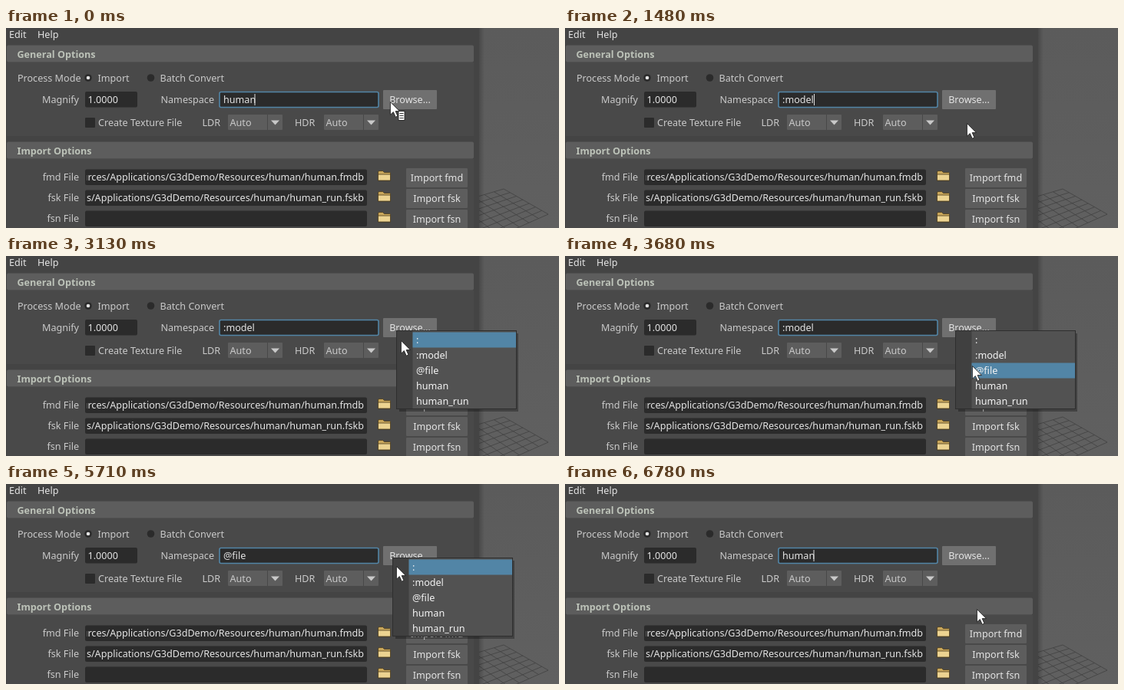
These frames come from a looping animation (720 px wide and 261 px high, 6.94 s). An HTML page:

```html
<!DOCTYPE html>
<html lang="en">
<head>
<meta charset="utf-8">
<title>Namespace menu</title>
<style>
html, body { margin: 0; width: 100%; height: 100%; overflow: hidden; background: #444; }
svg { display: block; }
text { font: 12.6px "Noto Sans", "Open Sans", sans-serif; fill: #cacaca; white-space: pre; }
.bold { font-weight: bold; fill: #bcc2b8; }
.end { text-anchor: end; }
.mid { text-anchor: middle; }
.lit { fill: #e4e4e4; }
#menu text { fill: #f4f4f4; }
</style>
</head>
<body>
<svg id="stage" width="720" height="261" viewBox="0 0 720 261"></svg>
<script>
const LOOP = 6940, ROW = 20;
const ITEMS = [':', ':model', '@file', 'human', 'human_run'];

const rect = (x, y, w, h, fill, extra = '') =>
  `<rect x="${x}" y="${y}" width="${w}" height="${h}" fill="${fill}" ${extra}/>`;
const text = (x, y, s, cls = '', id = '') => `<text x="${x}" y="${y}" class="${cls}" id="${id}">${s}</text>`;
const line = (a, b) => `M${a}L${b}`;
const mix = (a, b, u) => a.map((v, i) => v + (b[i] - v) * u);

const field = (x, y, w) => rect(x, y, w, 20.5, '#2b2b2b', 'rx="2"');
const header = (y, s) => rect(1, y, 608, 22, '#5d5d5d', 'rx="2"') + text(14.5, y + 16, s, 'bold');
const button = (x, y, w, s, fill = '#5d5d5d') =>
  rect(x, y, w, 25, fill, 'rx="1"') + text(x + w / 2, y + 17, s, 'mid lit');
const radio = (x, on) => `<circle cx="${x}" cy="65" r="4.8" fill="#2b2b2b"/>` +
  (on ? `<circle cx="${x}" cy="65" r="2.3" fill="#e4e4e4"/>` : '');
const combo = (x, label, labelX) => text(labelX, 128, label) +
  rect(x, 113, 71, 20, '#5d5d5d', 'rx="1"') + rect(x + 51, 113, 1, 20, '#484848') +
  text(x + 2.5, 128, 'Auto') + `<path d="M${x + 56} 120.5h11l-5.5 6z" fill="#c8c8c8"/>`;
const folder = y => `<g stroke="#4a3c1c" stroke-width=".8">` +
  `<path d="M484.5 ${y}v-11q0-1.5 1.5-1.5h4.5l2 2h7q1 0 1 1v9.5z" fill="#c9a75c"/>` +
  `<path d="M484.5 ${y}v-8h16v8z" fill="#ecd391"/></g>`;
const fileRow = (y, ext, path) => text(95, y + 15, ext + ' File', 'end') + field(103, y + .5, 367) +
  `<svg x="105" y="${y}" width="363" height="22">${text(361, 15, path, 'end lit')}</svg>` +
  folder(y + 15) + button(521, y - 1, 80, 'Import ' + ext);

function grid() {
  const top = [648, 210], right = [706, 243], left = [560, 236], near = [618, 282];
  const count = 7;
  let d = '';
  for (let i = 0; i <= count; i++) {
    const u = i / count;
    d += line(mix(top, right, u), mix(left, near, u)) + line(mix(top, left, u), mix(right, near, u));
  }
  return `<path d="${d}" fill="none" stroke="#424242" stroke-width=".8"/>`;
}

const stage = document.getElementById('stage');
stage.innerHTML = `
<defs>
  <linearGradient id="view" x2="0" y2="1"><stop stop-color="#5b5b5b"/><stop offset="1" stop-color="#606060"/></linearGradient>
  <linearGradient id="shade"><stop stop-opacity=".2"/><stop offset="1" stop-opacity="0"/></linearGradient>
</defs>
${rect(0, 0, 720, 261, 'url(#view)')}${grid()}${rect(616, 0, 7, 261, 'url(#shade)')}
${rect(0, 0, 616, 261, '#444')}${rect(1, 45, 608, 96, '#494949')}${rect(1, 171, 608, 90, '#494949')}
${text(4, 13, 'Edit', 'lit')}${text(41, 13, 'Help', 'lit')}
${header(22.5, 'General Options')}
${text(97.5, 69.5, 'Process Mode', 'end')}${radio(107, true)}${text(119.5, 69.5, 'Import')}
${radio(188.5, false)}${text(200.5, 69.5, 'Batch Convert')}
${text(95, 98, 'Magnify', 'end')}${field(103, 83, 68)}${text(106.5, 98, '1.0000', 'lit')}
${text(271, 98, 'Namespace', 'end')}${rect(278, 83.5, 207, 20, '#2b2b2b', 'rx="2" stroke="#5285a6" stroke-width="1.6"')}
${text(283, 98, '', 'lit', 'name')}<path id="caret" d="M0 86v15" stroke="#e0e0e0"/>
${button(491, 81, 70, 'Browse...', '#707070')}
${rect(103, 117, 13, 13, '#2b2b2b', 'rx="1"')}${text(120, 128, 'Create Texture File')}
${combo(289, 'LDR', 255.5)}${combo(414, 'HDR', 376)}
${header(148.5, 'Import Options')}
${fileRow(184, 'fmd', 'Resources/Applications/G3dDemo/Resources/human/human.fmdb')}
${fileRow(211, 'fsk', 'Resources/Applications/G3dDemo/Resources/human/human_run.fskb')}
${fileRow(238, 'fsn', '')}
<g id="menu">
  ${rect(3, 3, 155, 102, '#000', 'opacity=".3"')}
  ${rect(0, 0, 156, 102, '#525252')}${rect(0, 0, 20.5, 102, '#404040')}
  ${rect(20.5, 0, 135, ROW, '#5285a6', 'id="light"')}
  ${rect(-.5, -.5, 156, 102, 'none', 'stroke="#2e2e2e"')}
  ${ITEMS.map((s, i) => text(25, 16 + i * ROW, s)).join('')}
</g>
<g id="cursor" stroke="#222" stroke-width=".9">
  <path d="M.4 .5V17.2L4.3 13.6L7.2 20.2L10 19L7.2 12.6H12.4Z" fill="#fff"/>
  <g id="badge"><path d="M11 12.5h8v12h-8z" fill="#fff"/><path d="M12.5 15.5h5m-5 3h5m-5 3h5"/></g>
</g>`;

const MOVES = [
  [250, 250, 1, [0, 500, 96], [1, 501, 99]],
  [710, 1090, 6, [0, 501, 99], [1, 507, 102], [6, 523, 124]],
  [1950, 2420, 7, [0, 523, 124], [5, 509, 101], [7, 508, 98]],
  [3040, 3680, 9, [0, 508, 98], [5, 524, 127], [9, 530, 143]],
  [4690, 5320, 9, [0, 530, 143], [5, 503, 103], [8, 503, 97], [9, 503, 97]],
  [5710, 6320, 9, [0, 503, 97], [5, 530, 147], [9, 536, 163]],
];
// Open menus: from, to, x, y.
const MENUS = [[250, 1480, 502, 99], [2660, 4140, 509, 98], [5320, 6780, 504, 97]];
const NAMES = [[0, 'human', 324], [1480, ':model', 324.5], [4220, '@file', 312.5], [6780, 'human', 324]];
const CARETS = [[0, 80], [1480, 2030], [2570, 2660], [4220, 4770], [5240, 5320], [6780, LOOP]];

const during = t => ([from, to]) => t >= from && t < to;

function mouseAt(t) {
  const [start, end, steps, ...points] = MOVES.findLast(m => t >= m[0]) || [1, 1, 0, ...MOVES[0].slice(3)];
  const gap = (end - start) / (steps - 1) || 1;
  const step = Math.min(steps, Math.floor((t - start) / gap + .31) + 1);
  const k = Math.max(1, points.findIndex(p => p[0] >= step));
  const a = points[k - 1], b = points[k];
  return mix(a, b, Math.max(0, (step - a[0]) / (b[0] - a[0]))).slice(1).map(Math.round);
}

const part = Object.fromEntries(['name', 'caret', 'menu', 'light', 'cursor', 'badge']
  .map(id => [id, document.getElementById(id)]));
const show = (el, on) => el.setAttribute('visibility', on ? 'visible' : 'hidden');
const place = (el, x, y) => el.setAttribute('transform', `translate(${x} ${y})`);

function draw(t) {
  const [x, y] = mouseAt(t);
  const menu = MENUS.find(during(t));
  const [, name, caretX] = NAMES.findLast(n => t >= n[0]);
  part.name.textContent = name;
  place(part.caret, caretX, 0);
  show(part.caret, CARETS.some(during(t)));
  place(part.cursor, x, y);
  show(part.badge, !menu && y < 106);
  show(part.menu, menu);
  const row = menu ? Math.floor((y - menu[3] - 1.5) / ROW) : -1;
  show(part.light, row >= 0);
  if (menu) place(part.menu, menu[2], menu[3]);
  part.light.setAttribute('y', 1.5 + row * ROW);
}

const began = performance.now();
function tick() {
  draw((performance.now() - began) % LOOP);
  requestAnimationFrame(tick);
}
tick();
</script>
</body>
</html>
```
